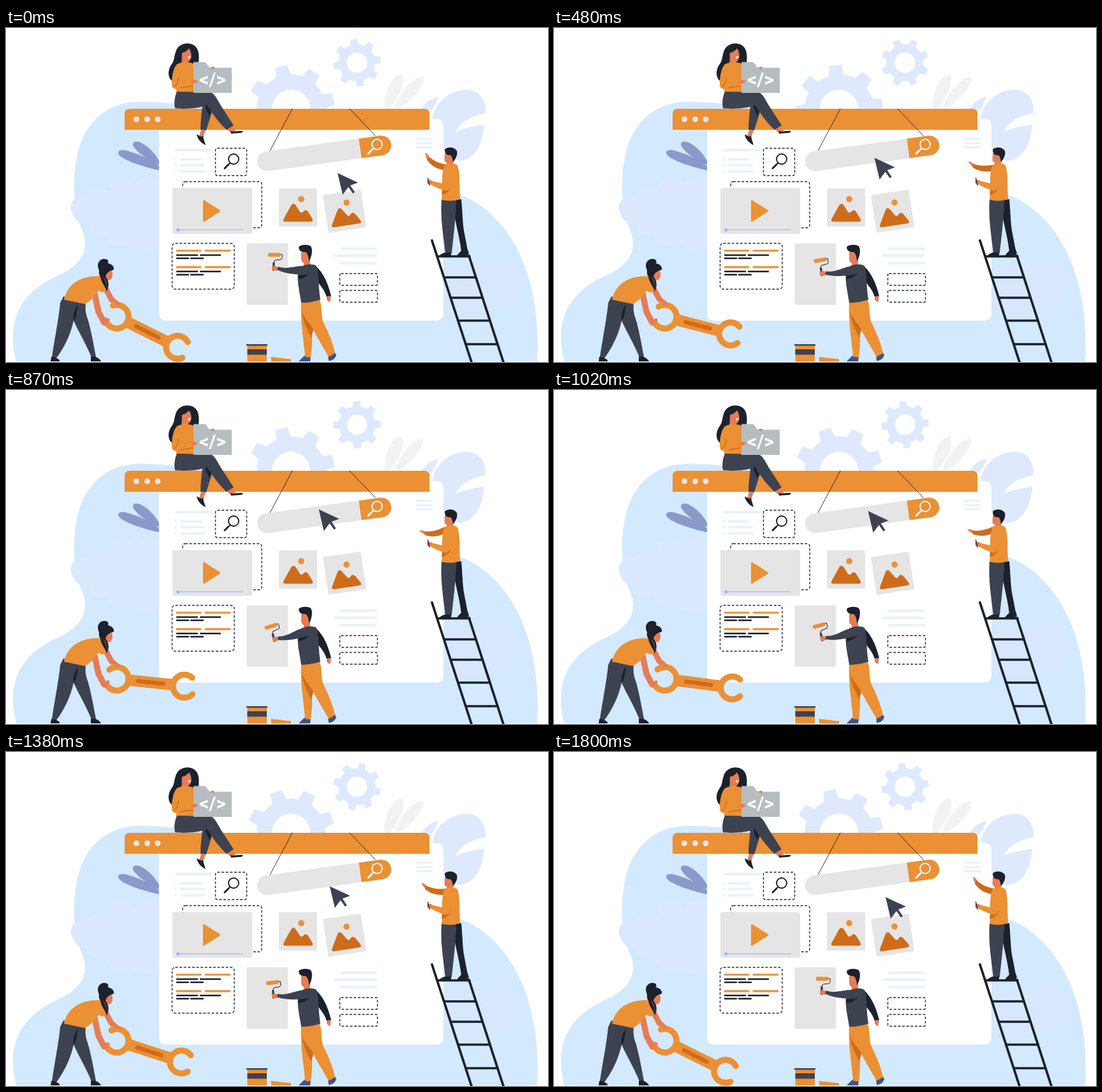
Animation, 850 px wide and 525 px high, one loop 1.83 s. Source, as an HTML page:

```html
<!DOCTYPE html>
<html lang="en">
<head>
<meta charset="utf-8">
<title>Web builders</title>
<style>
html, body { margin: 0; width: 100%; height: 100%; overflow: hidden; background: #fff; }
svg { display: block; width: 850px; height: 525px; }
.o { fill: #eb9034; } .d { fill: #cf6c1a; } .k { fill: #1b212d; } .n { fill: #3d4251; }
.s { fill: #e57c55; } .g { fill: #e5e5e5; } .p { fill: #dfe9fd; } .w { fill: #fff; }
.line { fill: none; stroke-linecap: round; stroke-linejoin: round; }
.ink { stroke: #1b212d; } .amber { stroke: #eb9034; } .skin { stroke: #e57c55; }
.pale { stroke: #e9f2fb; }
.dash { fill: none; stroke: #252b37; stroke-width: 1.4; stroke-dasharray: 4 2.6; }
</style>
</head>
<body>
<svg viewBox="0 0 850 525">
  <defs>
    <g id="photo">
      <rect class="g" x="-30" y="-30" width="60" height="60" rx="2"/>
      <circle class="o" cx="5" cy="-13" r="4.8"/>
      <path class="d" d="M-20 22.500Q-25 22.500-22 17L-11-3Q-8-8-4-4L3 7Q6 10 9 6Q12 2 16 7L22 17Q25 22.500 20 22.500Z"/>
    </g>
    <g id="lens" class="line">
      <circle r="8" stroke-width="1.900"/>
      <path d="M-5.500 6L-8 8.500" stroke-width="1.900"/>
      <path d="M-8 8.500L-14 14.500" stroke-width="3"/>
    </g>
  </defs>

  <!-- backdrop -->
  <path fill="#d3e9fe" d="M16 524C-2 452 30 412 82 389C124 370 132 342 117 312C103 276 104 222 116 184C131 141 165 116 210 116C250 116 290 121 320 128L690 256C766 270 842 358 833 524Z"/>
  <path fill="#dbe8fd" d="M240 235C222 232 208 236 203 244C190 232 172 235 163 242C160 250 166 255 171 258C150 252 132 253 123 264C104 264 99 279 103 289C108 304 120 312 134 307C124 317 138 330 157 325C158 342 180 346 196 340C204 350 225 349 240 344Z"/>
  <path fill="#d8e7fd" d="M686 382C710 360 722 391 742 378C760 355 788 366 800 385C819 389 817 413 797 415C808 432 782 447 763 434C740 458 708 452 686 446Z"/>
  <path class="p" d="M670 160C662 128 688 98 722 97C742 97 753 112 752 134C733 137 713 146 705 163C718 157 735 154 750 152C748 180 737 206 712 209C690 205 680 180 670 160ZM648 138C653 119 664 112 678 108C673 124 664 139 648 138Z"/>
  <path fill="#f2f2f2" d="M593 126C594 101 604 75 620 73C629 80 617 111 601 127ZM609 125C617 104 638 75 654 77C659 88 634 117 616 126Z"/>
  <path fill="#8a99ca" d="M241 224C214 218 184 208 177 199C173 193 181 190 190 193C212 199 230 208 241 218ZM241 216C220 206 203 194 199 184C198 178 206 177 213 181C226 188 236 200 241 211Z"/>
  <path id="bigGear" class="p" fill-rule="evenodd"/>
  <path id="smallGear" class="p" fill-rule="evenodd"/>

  <!-- browser window -->
  <rect class="w" x="240" y="143" width="446" height="317" rx="10"/>
  <path class="o" d="M186 160V135Q186 127 194 127H656Q664 127 664 135V160Z"/>
  <g class="g"><circle cx="204.500" cy="143.500" r="4.500"/><circle cx="221.500" cy="143.500" r="4.500"/><circle cx="238" cy="143.500" r="4.500"/></g>
  <path class="line pale" stroke-width="4" d="M267 192H322M275 206.500H305M275 215.500H310M275 225.500H311M266 206.500h.1M266 215.500h.1M266 225.500h.1M526 347H580M516 358H580M526 369.500H580"/>
  <path class="line pale" stroke-width="3" d="M644 174H668M644 181H668M644 187.500H668"/>
  <rect class="dash" x="328.500" y="189" width="49" height="43" rx="3"/>
  <use href="#lens" class="ink" x="357" y="206"/>
  <rect class="dash" x="277" y="241.500" width="124" height="72.500" rx="4"/>
  <rect class="g" x="261" y="251.500" width="125" height="72" rx="3"/>
  <path class="o" d="M309 272Q309 269.500 311.500 271L335 286Q337 287.500 335 289L311.500 304Q309 305.500 309 303Z"/>
  <path d="M270 317.300H372" stroke="#a9bff3" stroke-width="1.500"/>
  <circle cx="269.700" cy="317.300" r="2.600" fill="#9fb7f5"/>
  <use href="#photo" x="458" y="282"/>
  <use href="#photo" transform="translate(531 288) rotate(-8.500)"/>
  <path class="line ink" stroke-width=".9" d="M449 127L414 193M539 127L579 169"/>
  <g transform="translate(499 197) rotate(-7.800)">
    <rect class="g" x="-106" y="-15.500" width="212" height="31" rx="15.500"/>
    <path class="o" d="M57-15.500H90.500A15.500 15.500 0 0 1 90.500 15.500H57Z"/>
  </g>
  <use href="#lens" stroke="#fff" x="582" y="183"/>
  <rect class="dash" x="260.500" y="338.500" width="97.500" height="72" rx="5"/>
  <path class="line amber" stroke-width="3.200" d="M268 350H305M313 350H351M268 375.800H305M313 375.800H351"/>
  <path class="line ink" stroke-width="2.400" d="M268 357H300M305 357H336M268 362H286M290 362H309M268 382.700H300M305 382.700H336M268 387.700H286M290 387.700H309"/>
  <rect class="g" x="377.500" y="338.500" width="64.500" height="96.500"/>
  <rect class="dash" x="523.500" y="386" width="59" height="18.500" rx="2"/>
  <rect class="dash" x="523.500" y="412.500" width="59" height="18.500" rx="2"/>
  <path id="cursor" class="n" d="M520 228L552 243L540 247.500L547 258L544 260L537 250L528 262Z"/>

  <!-- woman sitting -->
  <g>
    <path class="k" d="M266 38C270 21 294 20 300 33C304 42 302 50 302 58L289 57C275 64 268 74 264 85C253 81 253 67 259 58C265 50 263 46 266 38Z"/>
    <path class="s" d="M276 39C281 38 285 35 287 32C291 38 292 46 289 50C287 53 285 53 284 57L274 57C277 51 275 46 276 39Z"/>
    <path class="w" d="M285 45L289.500 44Q289 48 286 48Z"/>
    <path class="o" d="M268 57C276 53 286 53 294 56L296 101H267L267 96Q260 96 260 88C260 74 263 62 268 57Z"/>
    <path class="line" stroke="#cf6c1a" stroke-width="1.300" d="M270 77Q271 86 264 92M274 94L293 91"/>
    <path class="n" d="M308 122L326 122L314 161L305 160C305 146 307 134 308 122Z"/>
    <path class="k" d="M312 118L326 122L319 138Q313 128 312 118Z"/>
    <path class="n" d="M268 100L321 101C328 104 331 112 337 122L357 153L346 160C334 149 324 135 315 121C304 127 275 128 265 126C263 116 265 107 268 100Z"/>
    <path class="s" d="M306 160L313 161L309 172L303 170ZM347 160L354 155L361 162L352 164Z"/>
    <path class="k" d="M299 167C303 169 307 173 309 169C310 176 312 180 313 184C306 181 300 174 299 167ZM352 162C359 164 362 161 371 162Q373 164 367 165L353 166Z"/>
    <path fill="#b5bdc0" d="M294 53.500H310Q314 53.500 316 58T323 62.500H354V102H294Z"/>
    <path class="s" d="M291 83Q297 80 301 83L298 87L291 87ZM320 63Q324 59 327 62L326 65Z"/>
    <text class="w" x="324" y="91" text-anchor="middle" font-family="Roboto, sans-serif" font-weight="700" font-size="30">&lt;/&gt;</text>
  </g>

  <!-- woman with wrench -->
  <path class="line skin" stroke-width="9" d="M157 411L165 426L174 434"/>
  <g id="wrench">
    <path class="line amber" stroke-width="9.500" d="M-13.500 13A18.500 18.500 0 1 0-13.500-13"/>
    <path class="line amber" stroke-width="9.500" d="M117-14.300A18 18 0 1 0 120.500 11.500"/>
    <path class="o" d="M15-9H92V9H15Z"/>
    <path class="line" stroke="#cf6c1a" stroke-width="6.500" d="M33.500 0H73"/>
  </g>
  <g>
    <path class="line skin" stroke-width="9.500" d="M139 418L145 446L154 463"/>
    <path class="line skin" stroke-width="5" d="M153 464L160 459M173 434L176 433"/>
    <path class="n" d="M90 422L125 433C124 442 125 449 128 457C133 473 137 495 141 517L134 518C127 499 115 480 106 460C101 484 90 504 79 519L72 517C76 490 83 455 85 432Z"/>
    <path class="k" d="M106 460C104 450 109 440 113 434C111 447 111 455 106 460Z"/>
    <path class="k" d="M71 517Q78 517 84 522V524H70ZM133 517Q141 515 148 522L149 524H133Z"/>
    <path class="s" d="M149 384L163 378C169 383 168 394 163 396C158 398 158 395 155 400L146 392Z"/>
    <path class="k" d="M146 381C141 370 147 363 154 363C161 363 161 367 160 370C167 371 170 376 169 380C162 382 158 384 156 391C162 398 162 406 158 414C157 404 151 397 148 391Q145 387 146 381Z"/>
    <path class="o" d="M91 427C95 408 110 390 145 390Q155 391 157 399C159 410 160 411 151 416L145 413C136 426 130 430 124 434Z"/>
    <path class="k" d="M151 391C157 396 159 407 158 414C155 405 149 399 148 391Z"/>
  </g>

  <!-- paint pot -->
  <path class="o" d="M378.500 498H409V524H378.500ZM415.500 517L447 520.500V524H416Z"/>
  <path class="n" d="M377 497H410V499.500H377ZM378.500 505H409V513.500H378.500Z"/>

  <!-- painter -->
  <path class="k" d="M485 374C494 380 505 398 510 422L503 423C499 409 489 401 484 393Z"/>
  <path class="s" d="M503 422L509 421Q510 429 507 431L503 427Z"/>
  <path class="s" d="M463 350L476 348L477 374H467V369C462 369 463 361 463 350Z"/>
  <path class="k" d="M459 344C464 340 473 340 478 343C482 349 479 361 475 367C475 360 473 352 468 352C463 352 459 350 459 344Z"/>
  <path fill="#415286" d="M468 515L478 517L477 524H459Q464 519 468 515ZM505 515L515 509L518 514Q515 523 506 523Z"/>
  <path class="o" d="M463 430L492 427C496 440 494 450 497 461C505 477 512 493 516 511L506 517C497 501 486 483 479 469C481 486 480 503 478 518L469 517C467 490 461 460 463 430Z"/>
  <path class="d" d="M464 445C469 460 479 466 482 474L479 486C472 474 466 462 464 445Z"/>
  <path class="n" d="M468 373C475 371 482 371 487 374C491 384 489 398 493 427Q478 432 463 432C461 417 456 400 458 383C460 376 463 374 468 373Z"/>
  <path class="k" d="M458 389L476 386Q470 393 459 395Z"/>
  <g id="painterArm">
    <path class="line ink" stroke-width="1" d="M430 356H433Q434 363 431 364L422 365Q420 366 420 371"/>
    <rect class="o" x="411" y="353.500" width="19.500" height="6" rx="1.500"/>
    <path class="line" stroke="#3d4251" stroke-width="3.500" d="M420 369.500L419.500 380"/>
    <path class="s" d="M417 375Q422 372 428 377L426 381Q420 382 417 379Z"/>
    <path class="n" d="M427 375C437 379 446 376 462 374L474 377Q478 384 472 388C455 388 437 386 425 380Z"/>
  </g>

  <!-- ladder and man -->
  <path class="line ink" stroke-width="3.800" d="M668 334L730 525M726 358L780 525"/>
  <path class="line ink" stroke-width="3.400" d="M677 359H727M688 392H737M698 424H747M710 460H759M722 497H771"/>
  <path class="k" d="M699 271L714 269C716 290 716 305 718 318L724 349L714 351C711 325 703 300 699 271Z"/>
  <path class="n" d="M683 270L706 271C706 292 702 327 699 354L689 354C686 327 681 300 683 270Z"/>
  <path class="k" d="M688 353H698V359H679Q681 355 688 353ZM714 350L724 348L726 354L723 359H706Q709 355 714 350Z"/>
  <path class="s" d="M688 197L699 195L702 216L691 217V211C686 211 688 204 688 197Z"/>
  <path class="k" d="M688 191C693 186 703 187 707 193C709 199 705 206 701 211C700 204 699 199 694 200Q688 199 688 191Z"/>
  <g id="ladderArm">
    <path class="s" d="M657 196Q661 197 664 203L661 208Q658 201 657 196Z"/>
    <path class="d" d="M663 202C671 209 680 213 692 215L691 224C677 223 667 217 660 207Z"/>
  </g>
  <path class="o" d="M688 215C695 212 702 212 707 215C712 221 711 243 712 269Q699 274 683 270C686 254 681 232 688 215Z"/>
  <path class="d" d="M683 262Q693 261 698 250L694 247L685 249Z"/>
  <path class="o" d="M667 240L687 245L694 232L702 235C700 247 696 256 689 256Q676 252 666 246Z"/>
  <path class="s" d="M660 240Q664 237 668 240L667 246L661 245Z"/>
  <path class="line ink" stroke-width="1.300" d="M661.500 236L664 247"/>
</svg>
<script>
const STEP = 30, LOOP = 1830, PEAK = 860, END = 1800;
const el = id => document.getElementById(id);
const set = (id, value) => el(id).setAttribute("transform", value);

// Eight-toothed gear centred on the origin
function gear(id, tip, body, hole) {
  const teeth = 8, turn = Math.PI * 2 / teeth, root = .22, crown = .14;
  const at = (r, a) => `${(r * Math.sin(a)).toFixed(2)} ${(-r * Math.cos(a)).toFixed(2)}`;
  let d = "";
  for (let i = 0; i < teeth; i++) {
    const a = i * turn;
    d += `${i ? "L" : "M"}${at(body, a - root)}L${at(tip, a - crown)}L${at(tip, a + crown)}L${at(body, a + root)}`;
    d += `A${body} ${body} 0 0 1 ${at(body, a + turn - root)}`;
  }
  d += `ZM${-hole} 0A${hole} ${hole} 0 1 0 ${hole} 0A${hole} ${hole} 0 1 0 ${-hole} 0Z`;
  el(id).setAttribute("d", d);
}

// Eased swing: 0 to 1 and back
function swing(t) {
  const x = t < PEAK ? t / PEAK : Math.max(0, (END - t) / (END - PEAK));
  return (1 - Math.cos(Math.PI * x)) / 2;
}

function draw(now) {
  const t = Math.floor((now % LOOP) / STEP) * STEP;
  const p = swing(t);
  set("bigGear", `translate(447 127) rotate(${-13 + 90 * p})`);
  set("smallGear", `translate(550.5 54.5) rotate(${-8 + 52 * p})`);
  set("cursor", `translate(${-29.5 * p} ${-40.5 * p})`);
  set("wrench", `translate(174 454) rotate(${26.6 - 20.5 * p})`);
  set("painterArm", `rotate(${-17 * p} 468 382)`);
  set("ladderArm", `rotate(${-37 * p} 690 222)`);
}

gear("bigGear", 69, 54, 30);
gear("smallGear", 37.5, 29, 16);
const start = performance.now();
function tick() {
  draw(performance.now() - start);
  requestAnimationFrame(tick);
}
tick();
</script>
</body>
</html>
```
